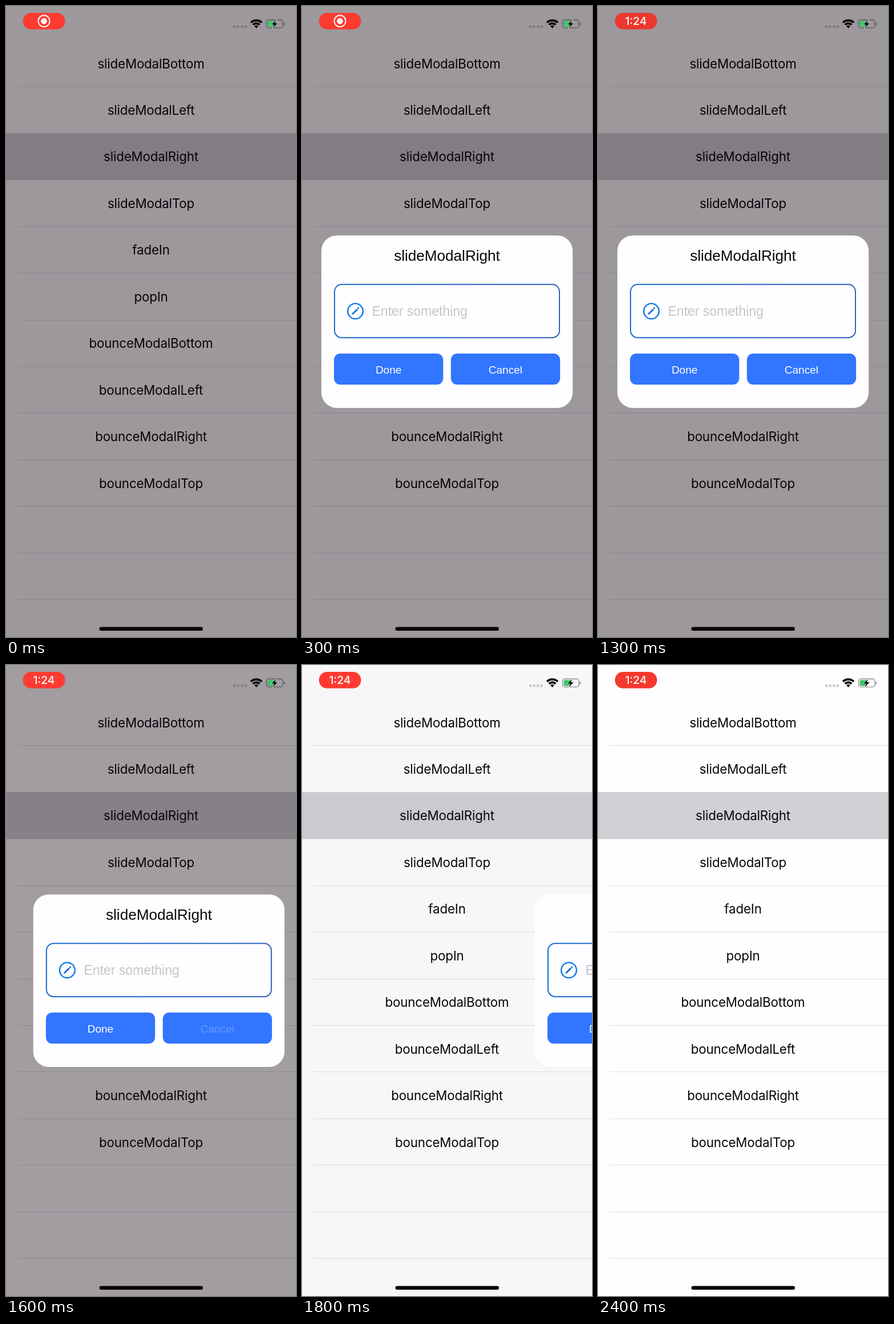
These frames come from a looping animation (508x1102 px, 2.5 s). An HTML page with a canvas:

```html
<!DOCTYPE html>
<html lang="en">
<head>
<meta charset="utf-8">
<title>Modal transitions</title>
<style>
  html, body { margin: 0; width: 100%; height: 100%; overflow: hidden; background: #fefdff; }
  canvas { display: block; width: 508px; height: 1102px; }
</style>
</head>
<body>
<canvas id="stage"></canvas>
<script>
const W = 508, H = 1102, LOOP = 2500, TICK = 100;
const ROW = 81.45, TRAVEL = 425;
const PAPER = '#fefdff', INK = '#060507';
const SANS = 'Inter, Roboto, sans-serif';
const HELV = '"Liberation Sans", Arial, sans-serif';
const SIDES = ['Bottom', 'Left', 'Right', 'Top'];
const ITEMS = [...SIDES.map(side => 'slideModal' + side), 'fadeIn', 'popIn',
  ...SIDES.map(side => 'bounceModal' + side)];

const canvas = document.getElementById('stage');
const ctx = canvas.getContext('2d');
const ratio = window.devicePixelRatio || 1;
canvas.width = Math.round(W * ratio);
canvas.height = Math.round(H * ratio);

const mix = (a, b, p) => a + (b - a) * p;
const progress = (t, start, duration) => Math.min(1, Math.max(0, (t - start) / duration));
const ease = p => p * p * (3 - 2 * p);

function roundRect(x, y, w, h, r, fill) {
  ctx.beginPath();
  ctx.roundRect(x, y, w, h, r);
  if (fill) {
    ctx.fillStyle = fill;
    ctx.fill();
  }
}

function circle(x, y, r) {
  ctx.beginPath();
  ctx.arc(x, y, r, 0, Math.PI * 2);
}

function polygon(points) {
  ctx.beginPath();
  points.forEach(([x, y]) => ctx.lineTo(x, y));
  ctx.closePath();
}

function text(label, x, y, font, color, align = 'center', spacing = 0) {
  ctx.font = font;
  ctx.letterSpacing = spacing + 'px';
  ctx.textAlign = align;
  ctx.fillStyle = color;
  ctx.fillText(label, x, y);
}

function drawList() {
  ctx.fillStyle = PAPER;
  ctx.fillRect(0, 0, W, H);
  ctx.fillStyle = '#e0dfe3';
  for (let i = 0; i < 12; i++) ctx.fillRect(20, Math.round(140.3 + ROW * i), W - 20, 1);
  ctx.fillStyle = '#d1d0d5';
  ctx.fillRect(0, 222, W, 82);
  ITEMS.forEach((item, i) =>
    text(item, 254, 108.5 + ROW * i, `22.3px ${SANS}`, INK, 'center', -0.15));
}

function drawDim(t) {
  const alpha = 0.4 * (1 - ease(progress(t, 1560, 285)));
  ctx.fillStyle = `rgba(8,0,8,${alpha})`;
  ctx.fillRect(0, 0, W, H);
}

function drawButton(label, x, alpha) {
  roundRect(x, 607, 191.3, 54.2, 11, '#3276ff');
  text(label, x + 95.6, 641.5, `19px ${HELV}`, `rgba(255,255,255,${alpha})`);
}

function drawPencil() {
  ctx.strokeStyle = '#0b78ea';
  ctx.lineWidth = 2.4;
  circle(93.5, 533, 13.4);
  ctx.stroke();
  ctx.save();
  ctx.translate(93.5, 533);
  ctx.rotate(-Math.PI / 4);
  ctx.fillStyle = '#0b62c8';
  polygon([[-9, 0], [-6, -1.3], [5, -1.3], [5, 1.3], [-6, 1.3]]);
  ctx.fill();
  ctx.fillRect(6, -1.3, 2.5, 2.6);
  ctx.restore();
}

function drawModal(t) {
  const opening = ease(progress(t, 0, 300));
  const closing = ease(progress(t, 1568, 296));
  if (opening === 0 || closing === 1) return;

  ctx.save();
  ctx.translate(TRAVEL * (1 - opening + closing), 0);
  roundRect(33.9, 400.7, 440.2, 301.3, 27, PAPER);
  text('slideModalRight', 254, 445, `26.1px ${HELV}`, INK);

  const edge = ctx.createLinearGradient(56, 0, 452, 0);
  edge.addColorStop(0, '#146bcd');
  edge.addColorStop(1, '#2d61b9');
  ctx.strokeStyle = edge;
  ctx.lineWidth = 2;
  roundRect(57, 486.2, 394, 93, 12.5);
  ctx.stroke();

  drawPencil();
  text('Enter something', 122.5, 541, `23px ${HELV}`, '#c5c4c9', 'left');
  drawButton('Done', 56, 1);
  drawButton('Cancel', 260.8, t < 1500 ? 1 : mix(0.25, 1, progress(t, 1600, 200)));
  ctx.restore();
}

function drawPill(t) {
  const pulse = Math.sin(Math.PI * t / 1900) ** 4;
  roundRect(29.8, 12, 73.5, 28.8, 14, `rgb(${mix(255, 216, pulse)},${mix(59, 50, pulse)},${mix(49, 43, pulse)})`);
  if (t >= 1200) {
    text('1:24', 66.5, 33, `500 19.2px ${SANS}`, '#fff');
    return;
  }
  ctx.strokeStyle = ctx.fillStyle = '#fff';
  ctx.lineWidth = 1.9;
  circle(66.5, 26.3, 10);
  ctx.stroke();
  circle(66.5, 26.3, 5.2);
  ctx.fill();
}

function drawWifi() {
  const x = 438.5, y = 39, spread = 0.75, up = -Math.PI / 2;
  ctx.fillStyle = INK;
  for (let i = 0; i < 3; i++) {
    const outer = 5 + 5.4 * i;
    ctx.beginPath();
    ctx.arc(x, y, outer, up - spread, up + spread);
    ctx.arc(x, y, i && outer - 3.7, up + spread, up - spread, true);
    ctx.fill();
  }
}

function drawBattery() {
  const gray = 'rgba(0,0,0,0.42)';
  ctx.strokeStyle = gray;
  ctx.lineWidth = 1.4;
  roundRect(456.5, 24.2, 28.5, 14.2, 4.2);
  ctx.stroke();
  roundRect(486.6, 29, 1.8, 5, [0, 2, 2, 0], gray);
  roundRect(458.5, 26.2, 13, 10.2, [2.4, 0, 0, 2.4], '#3cc567');
  polygon([[473.2, 24.5], [465.2, 32.4], [469.8, 32.4], [467.6, 38.3], [475.8, 30], [471, 30]]);
  ctx.strokeStyle = 'rgba(255,255,255,0.5)';
  ctx.lineWidth = 1.5;
  ctx.stroke();
  ctx.fillStyle = INK;
  ctx.fill();
}

function drawStatus(t) {
  drawPill(t);
  for (let i = 0; i < 4; i++) roundRect(398 + 6.5 * i, 34, 4.3, 4.6, 1.5, 'rgba(0,0,0,0.2)');
  drawWifi();
  drawBattery();
}

function draw(now) {
  const t = Math.floor((now % LOOP) / TICK) * TICK;
  ctx.setTransform(ratio, 0, 0, ratio, 0, 0);
  drawList();
  drawDim(t);
  drawModal(t);
  drawStatus(t);
  roundRect(163.5, 1084.5, 181.5, 6.6, 3.3, INK);
}

let start;
function frame(now) {
  start ??= now;
  draw(now - start);
  requestAnimationFrame(frame);
}
draw(0);
requestAnimationFrame(frame);
</script>
</body>
</html>
```
